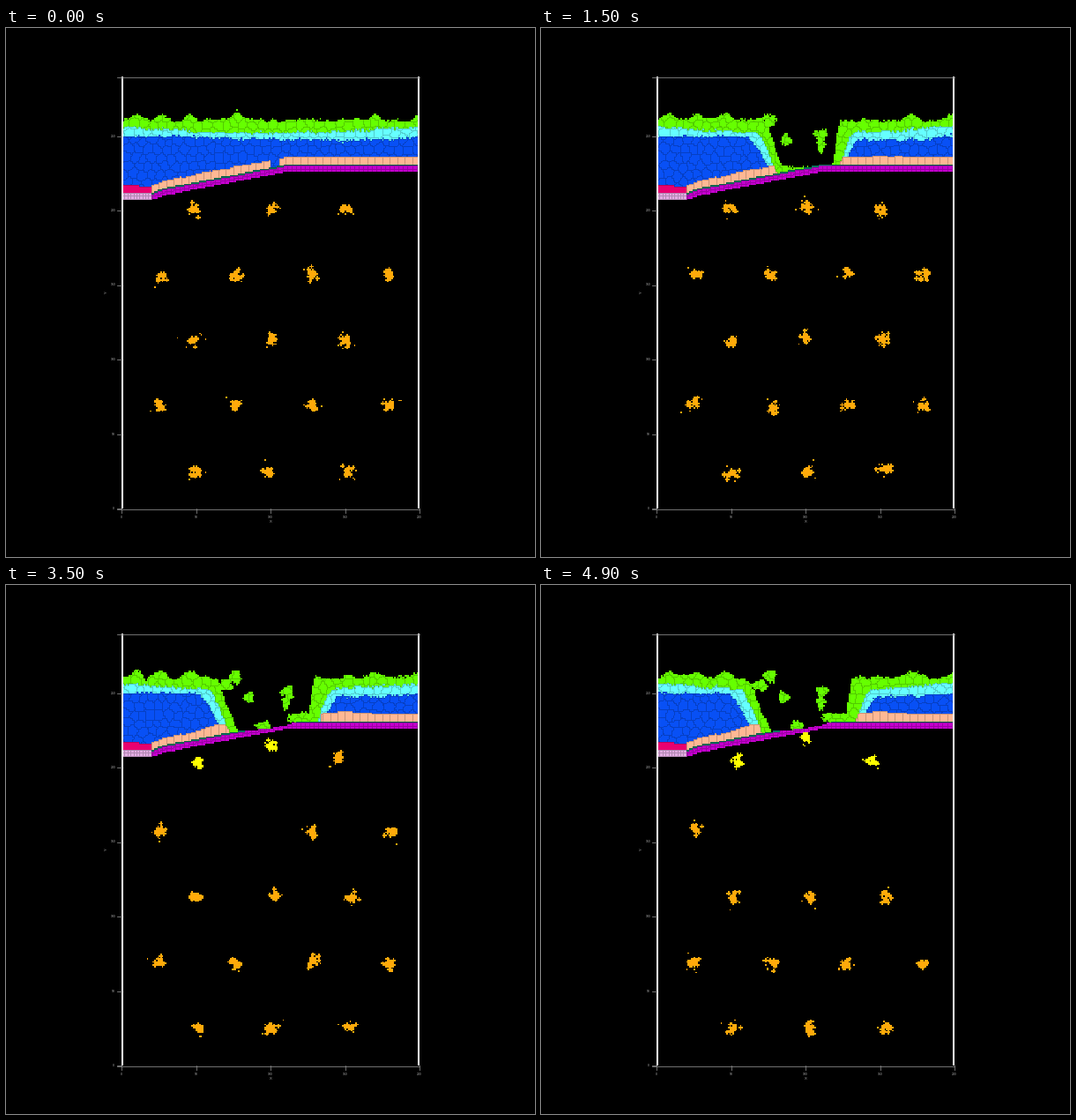
Write a matplotlib script that moves like this. It is 600 by 600 pixels and loops after 5000 ms.

```python
import numpy as np
import matplotlib.pyplot as plt
from matplotlib.animation import FuncAnimation

SIZE, STEP, FRAMES = 600, 100, 50
LOOP = STEP * FRAMES
COLS, ROWS, CELL = 200, 290, 1.69
LEFT, TOP, RIGHT, BOTTOM = 131, 55, 469, 545
MIDDLE = 300

(EMPTY, GREEN, CYAN, BLUE, PEACH, CRIMSON, PINK, TEAL, PURPLE,
 ORANGE, YELLOW) = range(11)
COLORS = np.array([
    (0, 0, 0), (102, 255, 0), (102, 255, 255), (8, 80, 245), (255, 184, 148),
    (232, 0, 112), (226, 172, 226), (0, 118, 92), (196, 0, 206),
    (255, 170, 10), (255, 255, 0)], float)

X = LEFT + (np.arange(COLS) + 0.5) * CELL
Y = (TOP + (np.arange(ROWS) + 0.5) * CELL)[:, None]
COL = np.arange(COLS)[None, :]
ROW = np.arange(ROWS)[:, None]
TISSUE = slice(18, 84)


def ramp(t, begin, end):
    return np.clip((t - begin) / (end - begin), 0, 1)


def smooth(f):
    return f * f * (3 - 2 * f)


def hill(centre, width):
    return np.exp(-((X - centre) / width) ** 2)


# Resting outlines of the layers
ARCH = np.sin(np.pi * (X - LEFT) / (RIGHT - LEFT))
SURFACE = 104.5 - 7 * sum(hill(c, 8) for c in (148, 177, 207, 260, 420, 468))
GREEN_FLOOR = 112 + 7 * ARCH
CYAN_FLOOR = 121.5 + 5 * np.interp(X, [200, 300, 430, 469], [0.2, 1, 1, 0.2])
FLOOR = np.interp(X, [165, 178, 318], [187, 182, 155])
FLOOR[X < 165] = 187
EROSION = np.interp(X, [262, 300, 318, 330], [0, 4.5, 4, 0])

# Loose green clumps: first time, x, y, half width, half height
ISLANDS = [(700, 260, 104, 7, 7), (700, 250, 114, 8, 6), (700, 277, 127, 6, 6),
           (700, 319, 121, 7, 7), (700, 317, 134, 5, 7), (2000, 292, 159, 8, 5),
           (2000, 334, 151, 15, 6)]

# Top row cells: time of activation, start of motion, shift towards the wound
RISERS = [(3100, 2900, 10, -6), (2300, 1700, 0, -32), (4600, 1500, -11, -7)]

seed_rng = np.random.default_rng(7)
sx, sy = np.meshgrid(np.arange(134, 474, 10.5), np.arange(90, 195, 9.5))
sx[1::2] += 5
SEEDS = np.stack([sx.ravel(), sy.ravel()], 1) + seed_rng.uniform(-2.8, 2.8, (sx.size, 2))
PHASES = seed_rng.uniform(0, 2 * np.pi, SEEDS.shape)
PEACH_HEIGHT = 8.8 + seed_rng.uniform(-0.8, 0.8, 50)[np.arange(COLS) // 5]


def ripple(rng, amount, knots=50):
    return np.interp(X, np.linspace(LEFT, RIGHT, knots), rng.normal(0, amount, knots))


def sink(rest, t, left, right):
    """Lower an outline into the wound; left and right are its final reach."""
    opening = 1 - np.exp(-(t / 1100) ** 0.7)
    depth = 75 * (1 - np.exp(-t / 1150))
    left_side = ramp(X, MIDDLE - left * opening, MIDDLE - 35 * opening)
    right_side = ramp(-X, -MIDDLE - right * opening, -MIDDLE - 42 * opening)
    return rest + depth * smooth(np.minimum(left_side, right_side))


def cell_labels(t):
    sites = (SEEDS + 1.5 * np.sin(t / 900 + PHASES)).astype(np.float32)
    dx = X.astype(np.float32)[None, :, None] - sites[:, 0]
    dy = Y[TISSUE].astype(np.float32)[:, :, None] - sites[:, 1]
    return np.argmin(dx * dx + dy * dy, axis=2)


def add_tissue(kind, t, rng):
    wound_time = max(t - 100, 0)
    surface = sink(SURFACE, wound_time, 74, 58) + ripple(rng, 1.5)
    green = sink(GREEN_FLOOR, wound_time, 82, 80) + ripple(rng, 0.8)
    cyan = sink(CYAN_FLOOR, wound_time, 97, 88) + ripple(rng, 0.8)
    rough = Y + rng.normal(0, 0.8, kind.shape)
    body = (rough >= surface) & (Y < FLOOR)
    kind[body] = GREEN
    kind[body & (rough >= green)] = CYAN
    kind[body & (rough >= np.maximum(green, cyan))] = BLUE

    gap = ramp(t, 900, 2600)
    swelling = gap * 3 * (hill(240, 15) + hill(385, 25))
    kept = (X < MIDDLE - 47 * gap) | (X > MIDDLE + 10 + 48 * gap)
    row = (Y >= FLOOR - PEACH_HEIGHT - swelling) & kept & (X > 164)
    kind[body & (kind != GREEN) & row] = PEACH
    kind[(X < 164) & (Y >= 178 + (X - LEFT) * 0.06) & (Y < 187)] = CRIMSON


def add_membrane(kind, t):
    worn = EROSION * ramp(t, 1500, 2700)
    depth = Y - FLOOR
    band = (depth >= worn) & (depth < 8.2)
    kind[band] = PURPLE
    kind[band & (depth < 1.7) & (worn < 2)] = TEAL
    kind[(X < 165) & (depth >= 0) & (depth < 8)] = PINK


def add_islands(kind, t, rng):
    for begin, x, y, rx, ry in ISLANDS:
        size = ramp(t, begin, begin + 500)
        if size == 0:
            continue
        cx, cy = np.array([x, y]) + rng.normal(0, 0.8, 2)
        angle = np.arctan2(Y - cy, X - cx)
        edge = 1 + 0.15 * np.sin(3 * angle + rng.uniform(0, 6))
        edge = edge + rng.normal(0, 0.1, kind.shape)
        inside = np.hypot((X - cx) / rx, (Y - cy) / ry) < edge * size
        kind[inside & (kind == EMPTY)] = GREEN


def add_blob(kind, rng, x, y, color, life=1.0):
    """A ragged cell body of small crosses with a few loose sites."""
    centre = np.array([(x - LEFT) / CELL, (y - TOP) / CELL])
    stretch = rng.uniform(0.8, 1.25)
    hearts = rng.normal(0, 1.75, (round(17 * life), 2)) * (stretch, 1 / stretch)
    loose = rng.normal(0, 3, (int(np.ceil(7 * life)), 2))
    cross = [(0, 0), (1, 0), (-1, 0), (0, 1), (0, -1)]
    sites = [heart + arm for heart in hearts for arm in cross] + list(loose)
    for site in sites:
        i, j = (centre + site).astype(int)
        if kind[j, i] == EMPTY:
            kind[j, i] = color


def add_blobs(kind, t, rng):
    """Staggered rows of three and four wandering cells."""
    for row in range(5):
        count = 3 + row % 2
        for k in range(count):
            x = (214, 174)[row % 2] + 86.5 * k
            y = 205 + 74.5 * row
            color, life = ORANGE, 1.0
            if row == 0:
                wake, begin, dx, dy = RISERS[k]
                pull = ramp(t, begin, min(begin + 2400, LOOP))
                x, y = x + dx * pull, y + dy * pull
                color = YELLOW if t >= wake else ORANGE
            elif row == 1 and k > 0:
                fade = 2400 + 500 * k
                life = 1 - ramp(t, fade, fade + 600)
            if row in (2, 4):
                x += 4 * t / LOOP
            jx, jy = rng.normal(0, 1, 2)
            add_blob(kind, rng, x + jx, y + jy, color, life)


def number_cells(kind, t):
    label = np.zeros(kind.shape, int)
    label[TISSUE] = cell_labels(t)
    tilings = {
        PEACH: COL // 5 + 0 * ROW,
        PURPLE: COL // 3 + 100 * (Y - FLOOR > 4.5),
        PINK: COL // 2 + 100 * (ROW // 2),
        TEAL: 0 * (COL + ROW),
        CRIMSON: 0 * (COL + ROW)}
    for material, tiles in tilings.items():
        label[kind == material] = tiles[kind == material]
    return label


PIXEL_COL = ((np.arange(LEFT, RIGHT) + 0.5 - LEFT) / CELL).astype(int)
PIXEL_ROW = ((np.arange(TOP, BOTTOM) + 0.5 - TOP) / CELL).astype(int)
WINDOW = np.ix_(PIXEL_ROW, PIXEL_COL)


def picture(frame):
    t = frame * STEP
    rng = np.random.default_rng(100 + frame)
    kind = np.zeros((ROWS, COLS), int)
    add_tissue(kind, t, rng)
    add_membrane(kind, t)
    add_islands(kind, t, rng)
    add_blobs(kind, t, rng)

    kinds = kind[WINDOW]
    ids = kinds * 10000 + number_cells(kind, t)[WINDOW]
    shade = np.ones(kinds.shape)
    for axis in (0, 1):
        other = np.roll(ids, 1, axis)
        border = (ids != other) & (other >= 10000) & (kinds < ORANGE)
        shade[border] = 0.8
    image = np.zeros((SIZE, SIZE, 3), np.uint8)
    image[TOP:BOTTOM, LEFT:RIGHT] = COLORS[kinds] * shade[..., None]
    image[TOP:BOTTOM, LEFT:LEFT + 2] = 255
    image[TOP:BOTTOM, RIGHT - 2:RIGHT] = 255
    return image


fig = plt.figure(figsize=(6, 6), dpi=100, facecolor="black")
ax = fig.add_axes([0, 0, 1, 1])
ax.axis("off")
view = ax.imshow(picture(0), extent=(0, SIZE, SIZE, 0), interpolation="nearest")
ax.set_xlim(0, SIZE)
ax.set_ylim(SIZE, 0)


def line(x0, y0, x1, y1):
    ax.plot([x0, x1], [y0, y1], color="#858585", lw=0.6)


def note(x, y, text, size=2.4, **kw):
    ax.text(x, y, text, color="#b0b0b0", fontsize=size, family="Liberation Sans",
            ha="center", va="center", **kw)


line(126, TOP + 0.5, RIGHT, TOP + 0.5)
line(126, BOTTOM + 0.5, RIGHT, BOTTOM + 0.5)
for value in range(0, 251, 50):
    offset = value * CELL
    line(126, BOTTOM - offset, LEFT, BOTTOM - offset)
    note(122, BOTTOM - offset, str(value))
    if value <= COLS:
        line(LEFT + offset, BOTTOM, LEFT + offset, BOTTOM + 5)
        note(LEFT + offset, 555, str(value))
note(300, 560, "X", 3)
note(113.5, 300, "Y", 3, rotation=90)


def update(frame):
    view.set_data(picture(frame))
    return [view]


animation = FuncAnimation(fig, update, frames=FRAMES, interval=STEP, repeat=True,
                          repeat_delay=0, blit=False)
plt.show()
```
